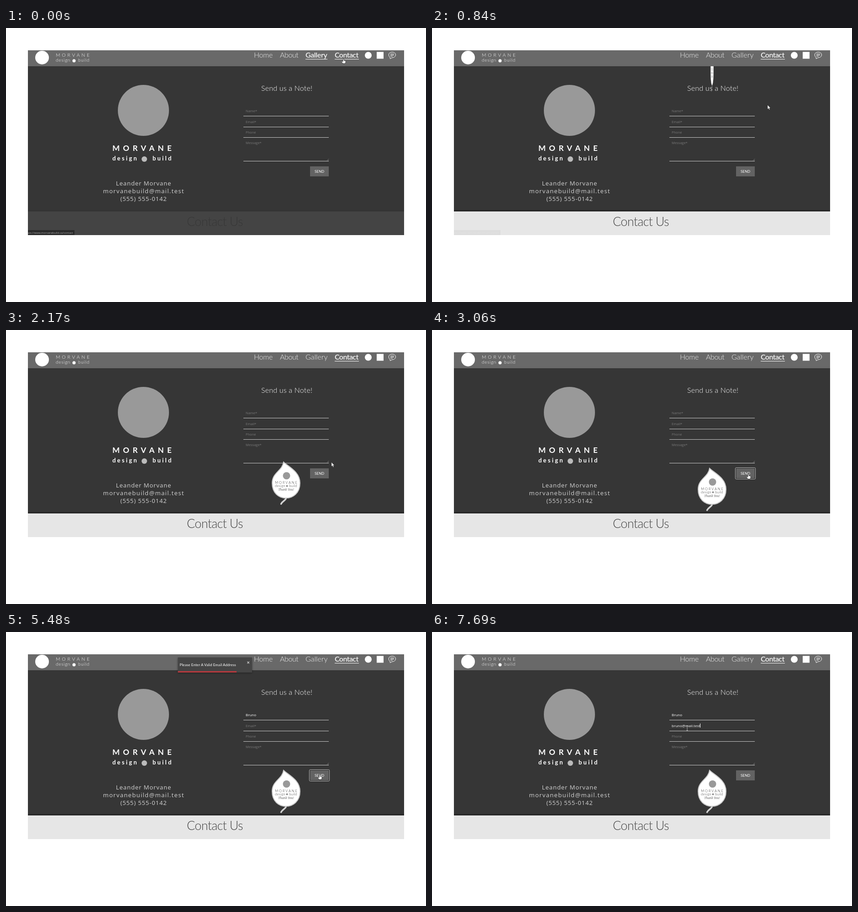
Recreate the animation shown at these times as an HTML page. Size 920x602 px, loop 8000 ms.

```html
<!DOCTYPE html>
<html lang="en">
<head>
<meta charset="utf-8">
<title>Contact page</title>
<style>
  html, body { margin: 0; width: 100%; height: 100%; overflow: hidden; background: #fff; }
  svg { display: block; width: 920px; height: 602px; }
  text { font-family: Lato, sans-serif; font-weight: 300; fill: #fff; white-space: pre; }
  .nav { font-size: 16px; fill: #eee; }
  .bold { font-weight: 600; fill: #f4f4f4; }
  .brand { font-size: 17px; font-weight: 700; letter-spacing: 7.3px; }
  .sub { font-size: 13px; font-weight: 700; letter-spacing: 3.2px; }
  .info { font: 300 13.2px "Noto Sans", sans-serif; fill: #c8c8c8; text-anchor: middle; }
  .hint, .typed { font: 400 7.5px "Open Sans", sans-serif; fill: #777; }
  .typed { font-size: 8px; fill: #fff; }
  .tag text { fill: #333; text-anchor: middle; }
</style>
</head>
<body>
<svg viewBox="0 0 920 602">
  <defs>
    <clipPath id="page"><rect x="48" y="49" width="824" height="406"/></clipPath>
    <clipPath id="main"><rect x="48" y="84" width="824" height="319"/></clipPath>
    <linearGradient id="shade" x2="0" y2="1">
      <stop stop-opacity="0"/><stop offset="1" stop-opacity=".4"/>
    </linearGradient>
    <filter id="soft" x="-10%" y="-30%" width="120%" height="170%">
      <feDropShadow dx="0" dy="1" stdDeviation="2" flood-opacity=".4"/>
    </filter>
  </defs>
  <g clip-path="url(#page)">
    <rect x="48" y="49" width="824" height="406" fill="#363636"/>

    <!-- company block -->
    <circle cx="301" cy="181" r="56" fill="#999"/>
    <text class="brand" x="233" y="270">MORVANE</text>
    <text class="sub" x="233" y="291">design</text>
    <circle cx="303" cy="288" r="6" fill="#bbb"/>
    <text class="sub" x="321" y="291">build</text>
    <text class="info" x="301.5" y="346" letter-spacing=".8">Leander Morvane</text>
    <text class="info" x="301.5" y="363" letter-spacing="1.2">morvanebuild@mail.test</text>
    <text class="info" x="301.5" y="380" letter-spacing=".8">(555) 555-0142</text>

    <!-- form -->
    <text x="559" y="138" font-size="16" letter-spacing=".2">Send us a Note!</text>
    <path d="M520 193.5H707M520 217.5H707M520 240.5H707M520 292.5H707" stroke="#c8c8c8"/>
    <path d="M703 291.5l4-4M705.5 291.5l1.5-1.5" stroke="#999" stroke-width=".7"/>
    <text class="hint" id="nameHint" x="525" y="185">Name*</text>
    <text class="hint" id="mailHint" x="525" y="208.5">Email*</text>
    <text class="hint" x="525" y="232">Phone</text>
    <text class="hint" x="525" y="255">Message*</text>
    <text class="typed" id="name" x="525" y="185"></text>
    <text class="typed" id="mail" x="525" y="208.5"></text>
    <path id="caret" d="M0 0v9" stroke="#fff"/>
    <rect x="666" y="304" width="41" height="22" fill="#636363"/>
    <g id="ring" fill="none">
      <rect x="665.5" y="303.5" width="42" height="23" rx="1.5" stroke="#181818"/>
      <rect x="664.5" y="302.5" width="44" height="25" rx="2" stroke="#c4c4c4"/>
    </g>
    <text x="676" y="318" font-size="8" style="font-weight:400">SEND</text>

    <!-- falling leaf tag, drawn around its vertical axis -->
    <g clip-path="url(#main)">
      <g id="leaf" class="tag">
        <path d="M0 80C-1 86-8 86-11 93" fill="none" stroke="#d2d2d2" stroke-width="3.5" stroke-linecap="round"/>
        <path d="M-5.5 1C5 11 30.5 22 30.5 47C30.5 69 15 80 0 80C-16 80-30.5 69-30.5 47C-30.5 24-8 20-5.5 1Z" fill="#fff" stroke="#ccc" stroke-width="2"/>
        <circle cx="1" cy="31" r="8" fill="#999"/>
        <text x="1" y="48.5" font-size="7.5" letter-spacing="2">MORVANE</text>
        <text x="-13" y="55.5" font-size="7.5" letter-spacing=".4">design</text>
        <circle cx="2" cy="53.5" r="2" fill="#888"/>
        <text x="15.5" y="55.5" font-size="7.5" letter-spacing=".4">build</text>
        <text x="0" y="64" font-size="6.5" style="font-family:'Noto Serif',serif;font-style:italic;font-weight:400;fill:#666">Thank You!</text>
      </g>
    </g>

    <!-- title band -->
    <g id="band">
      <rect x="48" y="398" width="824" height="5" fill="url(#shade)"/>
      <rect x="48" y="403" width="824" height="52" fill="#e6e6e6"/>
      <text x="396" y="435" font-size="27" letter-spacing="-.7" style="fill:#444">Contact Us</text>
    </g>
    <g id="status">
      <rect x="48" y="444" width="102" height="11" fill="#2b2b2b"/>
      <text x="47" y="452" style="font:400 6px 'Open Sans',sans-serif;fill:#aaa">tps://www.morvanebuild.ca/contact</text>
    </g>

    <!-- header -->
    <rect x="48" y="49" width="824" height="35" fill="#696969"/>
    <circle cx="79" cy="65" r="15" fill="#fff"/>
    <text x="109" y="63" font-size="10.5" letter-spacing="3.8">MORVANE</text>
    <text x="109" y="74" font-size="10" letter-spacing=".7">design</text>
    <circle cx="149" cy="72" r="3.5" fill="#fff"/>
    <text x="158" y="74" font-size="10" letter-spacing=".8">build</text>
    <text class="nav" x="543" y="65" letter-spacing="-.2">Home</text>
    <text class="nav" x="600" y="65" letter-spacing="-.4">About</text>
    <text class="nav" id="gallery" x="656" y="65">Gallery</text>
    <path id="galleryLine" d="M656 68.5H704" stroke="#fff"/>
    <text class="nav bold" x="720" y="65" letter-spacing="-.6">Contact</text>
    <path d="M720 68.5H773" stroke="#fff"/>
    <circle cx="793.5" cy="60" r="7.5" fill="#fff"/>
    <rect x="812" y="52.5" width="15" height="15" fill="#fff"/>
    <path d="M841 64.5C836 60 838 53 846 53C856 53 856 65 846 65L841.5 67.5ZM842 57h8M842 59.5h8M842 62h5" fill="none" stroke="#fff"/>

    <!-- notice -->
    <g id="toast">
      <rect x="376.5" y="56" width="162.5" height="33" fill="#454545" filter="url(#soft)"/>
      <text id="notice" x="380.5" y="75" font-size="8" letter-spacing=".1" style="font-weight:400"></text>
      <path d="M528.5 65l4.400 4.400m0-4.400l-4.400 4.400" stroke="#ccc" stroke-width="1.2"/>
      <rect id="bar" x="376.5" y="86" height="3" fill="#b8393e"/>
    </g>

    <!-- pointer shapes, hot spot at 0,0 -->
    <g id="pointer">
      <path id="arrow" d="M0 0V9.500L2.200 7.500L3.700 11L5.300 10.300L3.800 7H6.600Z" fill="#fff" stroke="#222" stroke-width=".6"/>
      <path id="hand" d="M-1 1Q0-1 1 1V4.200Q5 4 5 6V8.500L3.800 11H-1.200L-3.800 7.500Q-4 5.500-2.400 6L-1 7.200Z" fill="#fff" stroke="#222" stroke-width=".7"/>
      <path id="beam" d="M-1.500-4.500h3M0-4.500v10M-1.500 5.500h3" fill="none" stroke="#bbb" stroke-width=".9"/>
    </g>
  </g>
</svg>
<script>
const LOOP = 8000;
const el = {};
document.querySelectorAll('svg [id]').forEach(n => el[n.id] = n);

const clamp = (v, lo = 0, hi = 1) => Math.min(hi, Math.max(lo, v));
const smooth = p => p * p * (3 - 2 * p);
const show = (node, on) => node.setAttribute('visibility', on ? 'inherit' : 'hidden');
const fade = (node, v) => node.setAttribute('opacity', v);
const within = (t, a, b) => t >= a && t < b;

// Rows are [time, ...values].
function follow(rows, t) {
  let i = rows.findIndex(r => r[0] > t);
  if (i < 0) return rows[rows.length - 1].slice(1);
  if (i === 0) return rows[0].slice(1);
  const a = rows[i - 1], b = rows[i];
  const p = smooth((t - a[0]) / (b[0] - a[0]));
  return a.slice(1).map((v, k) => v + (b[k + 1] - v) * p);
}

const POINTER = [
  [100, 739, 67], [840, 735, 169], [1250, 745, 216], [1600, 743, 258],
  [1800, 743, 262], [2480, 690, 312], [2900, 692, 315], [3060, 693, 316],
  [3600, 693, 316], [4150, 545, 184], [4300, 545, 184], [4500, 686, 313],
  [5400, 687, 313], [5500, 687, 313], [5830, 559, 211]
];
const TOASTS = [
  { text: 'Please Enter Your Name', start: 3420, bar: 3560, out: 4500 },
  { text: 'Please Enter A Valid Email Address', start: 4840, bar: 5143, out: 6760 }
];
const NAME = 'Bruno', MAIL = 'bruno@mail.test';

function drawPointer(t) {
  const [x, y] = follow(POINTER, t);
  el.pointer.setAttribute('transform', `translate(${x} ${y})`);
  const onButton = x > 666 && x < 707 && y > 304 && y < 326;
  const onField = x > 520 && x < 707 && y > 172 && y < 293;
  const hand = onButton || y < 74;
  show(el.hand, hand);
  show(el.beam, onField);
  show(el.arrow, !hand && !onField);
}

// Drop and turn share one ease-out.
function drawLeaf(t) {
  const left = 258 * Math.pow(Math.max(0, 2850 - t) / 2010, 2.7);
  const turn = Math.cos(left / 258 * 84 * Math.PI / 180);
  el.leaf.setAttribute('transform', `translate(613.5 ${303 - left}) scale(${turn} 1)`);
  show(el.leaf, t > 600);
}

function drawToast(t) {
  const toast = TOASTS.find(n => within(t, n.start, n.out + 320));
  show(el.toast, toast);
  if (!toast) return;
  const { text, start, bar, out } = toast;
  const [y] = follow([
    [start, -42], [start + 140, 3], [start + 210, 0],
    [out, 0], [out + 60, -4], [out + 140, 5], [out + 320, -42]
  ], t);
  el.toast.setAttribute('transform', `translate(0 ${y})`);
  el.notice.textContent = text;
  el.bar.setAttribute('width', 162.5 * (1 - clamp((t - bar) / (out - bar))));
}

function drawForm(t) {
  const nameCount = clamp(Math.floor((t - 4260) / 25) + 1, 0, NAME.length);
  const mailCount = t >= 7690 ? 15 : t >= 7540 ? 14 : clamp(Math.floor((t - 6210) / 100) + 1, 0, 13);
  el.name.textContent = NAME.slice(0, nameCount);
  el.mail.textContent = MAIL.slice(0, mailCount);
  show(el.nameHint, !nameCount);
  show(el.mailHint, !mailCount);
  show(el.ring, within(t, 2890, 4250) || within(t, 4520, 5900));

  const inName = within(t, 4250, 4520), inMail = t >= 5900;
  show(el.caret, inName || inMail);
  const field = inName ? el.name : el.mail;
  const end = field.textContent ? field.getComputedTextLength() : 0;
  el.caret.setAttribute('transform', `translate(${Math.round(525 + end) + .5} ${inName ? 178 : 201})`);
}

function draw(t) {
  const hover = t < 150;
  el.gallery.classList.toggle('bold', hover);
  el.gallery.setAttribute('letter-spacing', hover ? -.4 : 0);
  show(el.galleryLine, hover);
  fade(el.band, .08 + .92 * smooth(clamp((t - 100) / 550)));
  fade(el.status, 1 - smooth(clamp((t - 550) / 330)));
  drawLeaf(t);
  drawForm(t);
  drawToast(t);
  drawPointer(t);
}

const begin = performance.now();
function tick() {
  draw((performance.now() - begin) % LOOP);
  requestAnimationFrame(tick);
}
tick();
</script>
</body>
</html>
```
